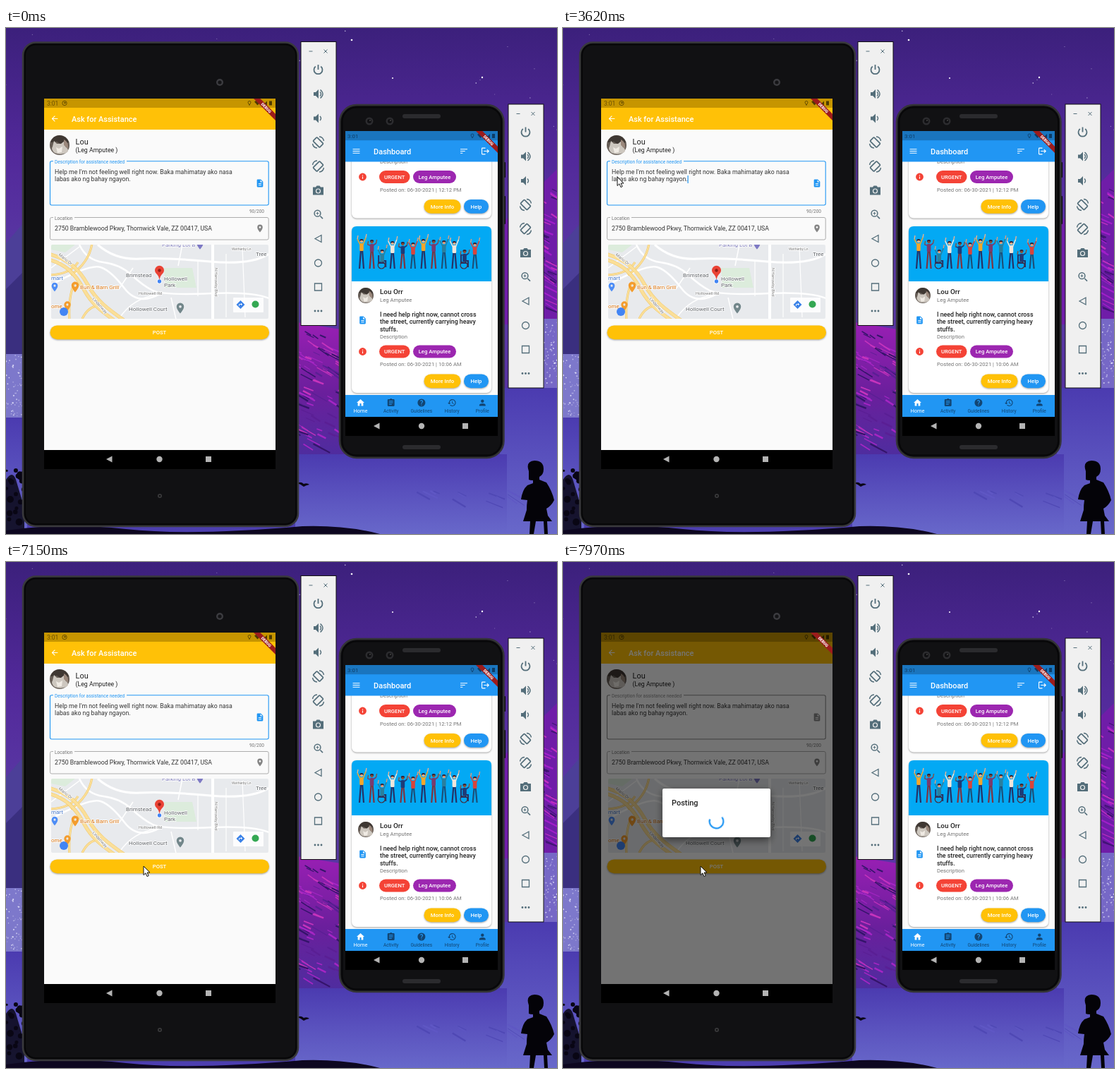
An HTML page that plays this animation: 781x717 px, repeating every 8000 ms.

```html
<!DOCTYPE html>
<html lang="en">
<head>
<meta charset="utf-8">
<title>Assistance request</title>
<style>
html, body { margin: 0; width: 100%; height: 100%; overflow: hidden; background: #38217f; }
svg { display: block; }
#stage { width: 100vw; height: 100vh; font-family: Roboto, "Open Sans", sans-serif; }
.shadow { filter: drop-shadow(0 1px 1px rgba(0,0,0,.35)); }
.deep { filter: drop-shadow(0 4px 6px rgba(0,0,0,.5)); }
</style>
</head>
<body>
<svg id="stage" viewBox="0 0 781 717"></svg>
<script>
const LOOP = 8000;
const BLUE = '#2196f3', AMBER = '#ffc107', SLATE = '#546e7a';

let seed = 11;
const rand = (a = 0, b = 1) => {
  seed = (seed * 16807) % 2147483647;
  return a + (b - a) * seed / 2147483647;
};
const repeat = (n, make) => Array.from({ length: n }, (_, i) => make(i)).join('');
const rect = (x, y, w, h, fill, r = 0, extra = '') =>
  `<rect x="${x}" y="${y}" width="${w}" height="${h}" rx="${r}" fill="${fill}" ${extra}/>`;
const circle = (x, y, r, fill, extra = '') => `<circle cx="${x}" cy="${y}" r="${r}" fill="${fill}" ${extra}/>`;
const path = (d, fill, extra = '') => `<path d="${d}" fill="${fill}" ${extra}/>`;
const line = (d, color, width, extra = '') =>
  path(d, 'none', `stroke="${color}" stroke-width="${width}" ${extra}`);
const text = (x, y, size, fill, str, extra = '') =>
  `<text x="${x}" y="${y}" font-size="${size}" fill="${fill}" ${extra}>${str}</text>`;
const MEDIUM = 'font-weight="500"', MIDDLE = 'text-anchor="middle"';

const ICONS = {
  back: 'M20 11H7.8l5.6-5.6L12 4l-8 8 8 8 1.4-1.4L7.8 13H20z',
  doc: 'M14 2H6a2 2 0 0 0-2 2v16a2 2 0 0 0 2 2h12a2 2 0 0 0 2-2V8zm2 16H8v-2h8zm0-4H8v-2h8zm-3-5V3.5L18.5 9z',
  place: 'M12 2a7 7 0 0 0-7 7c0 5.2 7 13 7 13s7-7.8 7-13a7 7 0 0 0-7-7zm0 9.5a2.5 2.5 0 1 1 0-5 2.5 2.5 0 0 1 0 5z',
  menu: 'M3 18h18v-2H3zm0-5h18v-2H3zm0-7v2h18V6z',
  sort: 'M3 18h6v-2H3zM3 6v2h18V6zm0 7h12v-2H3z',
  logout: 'M17 7l-1.4 1.4L18.2 11H8v2h10.2l-2.6 2.6L17 17l5-5zM4 5h8V3H4a2 2 0 0 0-2 2v14a2 2 0 0 0 2 2h8v-2H4z',
  info: 'M12 2a10 10 0 1 0 0 20 10 10 0 0 0 0-20zm1 15h-2v-6h2zm0-8h-2V7h2z',
  home: 'M10 20v-6h4v6h5v-8h3L12 3 2 12h3v8z',
  list: 'M19 3h-4.2a3 3 0 0 0-5.6 0H5a2 2 0 0 0-2 2v14a2 2 0 0 0 2 2h14a2 2 0 0 0 2-2V5a2 2 0 0 0-2-2zm-5 14H7v-2h7zm3-4H7v-2h10zm0-4H7V7h10z',
  help: 'M12 2a10 10 0 1 0 0 20 10 10 0 0 0 0-20zm1 17h-2v-2h2zm2-7.7c-1.5 1.2-2 1.7-2 3.7h-2c0-3 1-3.5 2.4-4.9A2 2 0 1 0 10 8H8a4 4 0 1 1 7 3.3z',
  history: 'M13 3a9 9 0 0 0-9 9H1l4 4 4-4H6a7 7 0 1 1 2 5l-1.4 1.4A9 9 0 1 0 13 3zm-1 5v5l4.3 2.5.7-1.2-3.5-2.1V8z',
  person: 'M12 12a4 4 0 1 0 0-8 4 4 0 0 0 0 8zm0 2c-2.7 0-8 1.3-8 4v2h16v-2c0-2.7-5.3-4-8-4z'
};
const icon = (name, x, y, size, fill) =>
  path(ICONS[name], fill, `fill-rule="evenodd" transform="translate(${x - size / 2} ${y - size / 2}) scale(${size / 24})"`);

function wallpaper() {
  const streaks = (n, x0, x1, y0, y1, colors) => repeat(n, i => {
    const x = rand(x0, x1), y = rand(y0, y1), w = rand(6, 24);
    return line(`M${x} ${y}l${w} ${w * rand(.35, .75)}`, colors[i % colors.length], rand(.8, 2.6));
  });
  const dots = (n, x0, x1, y0, y1, r) => repeat(n, () =>
    circle(rand(x0, x1), rand(y0, y1), rand(.4, r), '#eef', `opacity="${rand(.3, .9)}"`));
  return rect(0, 0, 781, 717, 'url(#sky)')
    + dots(26, 0, 781, 0, 180, .8)
    + circle(490, 17, 1.3, '#fff') + circle(675, 70, 1.2, '#fff') + circle(548, 71, 1, '#fff')
    + path('M0 305L30 270V480H0z', '#4c3f98') + path('M0 370l30-30v130H0z', '#3a2f7f')
    + rect(0, 462, 30, 95, '#7d78cb') + dots(70, 0, 26, 464, 550, 1.2)
    + rect(0, 552, 30, 165, 'url(#lake)')
    + path('M690 290L781 200V420H690z', '#6f1da8')
    + streaks(40, 745, 775, 225, 400, ['#a01fc9', '#3f1474', '#c230c0'])
    + rect(755, 412, 26, 100, '#7668c6') + dots(60, 762, 781, 414, 505, 1.2)
    + path('M400 415L480 428V620H400z', 'url(#rock)')
    + streaks(80, 400, 472, 425, 590, ['#a526c4', '#34146a', '#5a1f94', '#c634bc'])
    + rect(700, 510, 81, 207, 'url(#lake)') + rect(410, 604, 300, 113, 'url(#lake)')
    + streaks(14, 560, 720, 655, 672, ['#5f57c4', '#4f48b4'])
    + path('M0 640q9-14 14 0l12 40v37H0z', '#090614', 'opacity=".85"')
    + repeat(26, () => circle(rand(0, 32), rand(618, 700), rand(1.5, 5), '#090614'))
    + path('M0 712q80-12 170-2t250-4q60-2 110 11H0z', '#0d0720')
    + path('M413 645q5-3 9 1 5-2 8 1-5 1-8 3-3-3-9-5z', '#0a0616')
    + silhouette();
}

const silhouette = () => path('M741 628q-5-14 8-15 13 0 13 12 0 8-6 11v4l10 4q8 12 11 25-4 8-11 12l2 10 6 8h-7l1 18h-5l-1-18h-11l-3 18h-6l1-18h-10l5-16q0-8 1-14l-9-1q2-14 9-20l8-3v-4q-4 0-6-1z', '#040308');

function avatar(x, y, r) {
  return `<g transform="translate(${x} ${y}) scale(${r / 14})">` + circle(0, 0, 14, '#655c55')
    + path('M-13-4q4-10 13-10 10 1 13 10l-9 4-8-5z', '#3f3833')
    + path('M-8-6l4 4h6l5-4 1 8q6 4 3 8-9 5-18 1-6-5-3-9z', '#cdc7bf')
    + path('M-5 3l4 2 5-3-1 8-6 1z', '#f0ebe4') + path('M6-8q7 3 6 13l-6-5z', '#9a877b') + '</g>';
}

function banner(x, y) {
  return `<g transform="translate(${x} ${y}) rotate(45) scale(.548)">`
    + rect(-40, 28, 80, 12, '#9c1c1c')
    + text(0, 37.6, 10.2, '#fff', 'DEBUG', 'text-anchor="middle" font-weight="900"') + '</g>';
}

function statusIcons(x, y, fill) {
  return line(`M${x - 30} ${y + 3}l-2-4a2 2 0 1 1 4 0z`, fill, .8)
    + path(`M${x - 23} ${y - 2}q5-4 9 0l-4.5 5z`, fill)
    + path(`M${x - 5} ${y - 3}v6h-6z`, fill) + rect(x - 2, y - 3, 4, 6, fill);
}

const navKeys = (a, b, c, y) => path(`M${a - 5} ${y}l8.5-4.5v9z`, '#b4b4b4')
  + circle(b, y, 4.2, '#b4b4b4') + rect(c - 4, y - 4, 8, 8, '#b4b4b4');

function toolbar(dx, dy) {
  const s = (d, w = 1.6) => line(d, SLATE, w);
  const rotate = (y, flip) => `<g transform="translate(442.5 ${y}) scale(${flip} 1)">`
    + rect(-6.5, -3.8, 13, 7.6, 'none', 1, `stroke="${SLATE}" stroke-width="1.7" transform="rotate(45)"`)
    + s('M1.5-8q5.5.5 6.5 6M-1.5 8q-5.5-.5-6.5-6', 1.4) + '</g>';
  const speaker = y => path(`M436 ${y - 2.5}v5h3l4 4v-13l-4 4z`, SLATE);
  return `<g transform="translate(${dx} ${dy})">`
    + rect(418, 19.5, 50, 402, '#f0f0f0', 0, 'stroke="#111"')
    + s('M429.5 33h5M450.5 30.5l5 5m0-5l-5 5', 1)
    + s('M438.8 54.5a6 6 0 1 0 7.4 0M442.5 52v7', 1.8)
    + speaker(93.5) + s('M445 90.5q3 3 0 6M445.5 87.5q7 6 0 12', 1.4)
    + speaker(128) + s('M445 125q3 3 0 6', 1.4)
    + rotate(162, 1) + rotate(196, -1)
    + path('M435 225.5h4l1.5-2h4l1.5 2h4v11h-15z', SLATE) + circle(442.5, 231, 3, SLATE, 'stroke="#f0f0f0" stroke-width="1.2"')
    + s('M445.4 266.5l3.6 3.6') + circle(441.5, 262.7, 4.4, 'none', `stroke="${SLATE}" stroke-width="1.5"`) + s('M439.5 262.7h4m-2-2v4', 1)
    + s('M438 298.5l9-5v10z', 1.3) + circle(442.5, 333, 5, 'none', `stroke="${SLATE}" stroke-width="1.3"`)
    + s('M437.5 362h10v10h-10z', 1.3)
    + repeat(3, i => circle(438 + i * 4.5, 401, 1.4, SLATE)) + '</g>';
}

function map() {
  const road = (d, w = 2.5) => line(d, '#fff', w);
  const label = (x, y, str, fill = '#5f6368', size = 8, extra = '') =>
    text(x, y, size, fill, str, `stroke="#fff" stroke-width="1.5" paint-order="stroke" ${extra}`);
  const highway = (d, w) => line(d, '#efc66a', w + 1) + line(d, '#fbdf98', w);
  return '<g clip-path="url(#mapClip)">' + rect(64, 307, 308, 105, '#e8eaed')
    + path('M224 340h40l6 28h-44zM64 307h34l-14 11-20-4z', '#dcecdc')
    + road('M104 307q10 22 34 25t40 18 30 22 84 4 90 12') + road('M64 364q55-30 70-25t34 30 50 8')
    + road('M130 307q25 22 60 20t100 4 90-16', 3) + road('M293 300v120', 4) + road('M160 412q20-30 55-34m35-71l-6 30m-10 45l8 35', 1.5)
    + road('M272 330v50M312 320v90M335 310l4 100', 1.2) + road('M64 340l40-30M180 340l-20 30', 1.5)
    + highway('M64 350q28-2 38-18M92 350q26-18 30-45M98 360q-10 18-8 55M108 412q10-20 26-18', 2.2)
    + highway('M60 320C88 327 104 342 116 364S144 398 170 416', 4) + highway('M60 328C84 334 98 348 110 370S136 402 156 416', 4)
    + label(221, 310, 'Parking Lot B', '#7a78b8') + label(354, 323, 'Tree')
    + label(320, 315, 'Wetherby Ln', '#777', 5) + label(74, 322, 'Marlo Dr', '#777', 6, 'transform="rotate(38 74 322)"')
    + label(170, 353, 'Brimstead') + label(224, 358, 'Hollowell') + label(224, 367, 'Park')
    + label(188, 378, 'Hollowell Rd', '#777', 6) + label(174, 401, 'Hollowell Court')
    + label(105, 370, 'Bun &amp; Barn Grill', '#d7720e') + label(64, 357, 'mart', '#4275c8') + label(64, 397, 'ome', '#d7720e')
    + label(122, 384, 'Lindenway', '#777', 6, 'transform="rotate(48 122 384)"')
    + label(296, 340, 'N Harrowby Blvd', '#777', 5.5, 'transform="rotate(90 296 340)"')
    + icon('place', 98, 367, 18, '#f39c2d') + icon('place', 87, 394, 16, '#f39c2d')
    + icon('place', 69, 367, 15, '#4d8df6') + icon('place', 247, 397, 18, '#72868a') + icon('place', 275, 307, 16, '#7d79c4')
    + circle(82, 402, 6, '#4285f4')
    + circle(217.5, 359, 3.6, '#fff') + circle(217.5, 359, 2.7, '#4285f4')
    + path('M217.5 357q-1-6-4.5-9a6.5 6.5 0 1 1 9 0q-3.5 3-4.5 9z', '#ea4335') + circle(217.5, 343.5, 2.2, '#901d16')
    + rect(322, 382, 43, 21, '#fff', 1, 'opacity=".88"')
    + path('M332.5 386l6 6-6 6-6-6z', '#3b82e8') + line('M330.5 394v-2.5h4m-1.5-1.5l1.5 1.5-1.5 1.5', '#fff', .9)
    + circle(353.5, 391.5, 5, '#34a853') + '</g>';
}

function tablet() {
  return rect(24, 20.5, 390, 685.5, '#111113', 18, 'stroke="#39393c" stroke-width="2.5"')
    + rect(27, 23.5, 384, 679.5, 'none', 15, 'stroke="#070708" stroke-width="2"')
    + circle(303, 77, 5, '#3c3c40') + circle(303, 77, 2.6, '#141416') + circle(218, 663, 3, '#3a3a3c') + circle(218, 663, 1.3, '#111')
    + rect(54, 100, 328, 525, '#000') + rect(54, 100, 328, 498, '#fafafa')
    + rect(54, 113, 328, 31, AMBER) + rect(54, 100, 328, 13, '#c69500')
    + text(58, 110, 8.5, '#6b5000', '3:01') + circle(83, 106.5, 3.2, 'none', 'stroke="#6b5000"') + circle(83.5, 106, 1.3, '#6b5000')
    + statusIcons(375, 106.5, '#4f3b00')
    + icon('back', 69, 128.5, 13, '#fff') + text(93, 132.5, 10.94, '#fff', 'Ask for Assistance', MEDIUM)
    + avatar(76, 166, 14) + text(98.5, 165, 10.94, '#222', 'Lou') + text(98.5, 175.5, 8.75, '#222', '(Leg Amputee )')
    + '<g id="focus" color="#2196f3">' + rect(62.5, 188.8, 309.7, 62.2, 'none', 2.2, 'stroke="currentColor" stroke-width="1.1"')
    + rect(67, 187, 104, 4, '#fafafa') + text(69, 192, 6.56, 'currentColor', 'Description for assistance needed')
    + icon('doc', 360, 220, 13, 'currentColor') + '</g>'
    + text(69, 207, 8.75, '#333', "Help me I'm not feeling well right now. Baka mahimatay ako nasa")
    + text(69, 217.3, 8.75, '#333', 'labas ako ng bahay ngayon.')
    + rect(176.5, 209, 1.2, 11, BLUE, 0, 'id="caret"')
    + text(366, 262, 6.56, '#757575', '90/200', 'text-anchor="end"')
    + rect(62.5, 268.5, 309.7, 31.5, 'none', 2.2, 'stroke="#a4a4a4" stroke-width=".9"')
    + rect(67, 267, 30, 4, '#fafafa') + text(69, 271.5, 6.56, '#757575', 'Location')
    + text(69, 287, 8.75, '#333', '2750 Bramblewood Pkwy, Thornwick Vale, ZZ 00417, USA')
    + icon('place', 360, 284, 13, '#858585') + map()
    + rect(62.5, 421.5, 310.5, 19.7, AMBER, 9.8, 'class="shadow"')
    + text(217.5, 434.3, 7.66, '#fff', 'POST', `${MEDIUM} ${MIDDLE}`)
    + '<g id="modal" opacity="0">' + rect(54, 100, 328, 498, '#000', 0, 'opacity=".54"')
    + rect(141, 321, 153, 69, '#fff', 2.2, 'class="deep"') + text(154, 344.5, 10.94, '#222', 'Posting', MEDIUM)
    + '<g id="spinner">' + circle(217.5, 367.5, 9.8, 'none', `id="arc" pathLength="360" stroke="${BLUE}" stroke-width="2.2"`) + '</g></g>'
    + '<g clip-path="url(#tabletClip)">' + banner(382, 100) + '</g>' + navKeys(147, 217.5, 287, 611);
}

function crowd() {
  const skins = ['#f3b48d', '#8b4f38', '#e79d77'];
  const shirts = ['#f4a62a', '#d8443c', '#1d3b78', '#f1e6dc', '#2a7f9e', '#7a3b6f'];
  const trousers = ['#253266', '#7d3340', '#1c4f78'];
  return repeat(12, i => {
    const seated = i === 2 || i === 10, x = 504 + i * 14.6, y = seated ? 317 : 302 + i * 7 % 6;
    const shirt = shirts[i * 5 % 6], skin = skins[i % 3], reach = i % 3 === 1 ? -2 : -9;
    const feet = 341 - y;
    const lower = seated
      ? line('M-1 13h6v9M-5 5v11h8', trousers[0], 2) + circle(-1, 19, 5, 'none', 'stroke="#4a2b38" stroke-width="1.2"')
      : line(`M-1 13L-3 ${feet}M1 13L3 ${feet}`, trousers[i % 3], 2.2);
    return `<g transform="translate(${x} ${y})">` + lower
      + line(`M-2 5L-6 ${reach + 6}M2 5L6 ${reach + 4}`, shirt, 1.6)
      + line(`M-6 ${reach + 6}l1-5M6 ${reach + 4}l1-5`, skin, 1.3)
      + circle(0, 0, 2.2, skin) + path('M-2.4 0q-1-3 2.4-3t2.4 3q-2-2-4.800 0z', '#3a2030')
      + rect(-2.8, 3, 5.6, 11, shirt, 1.5) + '</g>';
  });
}

function phone() {
  const chip = (x, y, w, fill, str) => rect(x, y, w, 18, fill, 9)
    + text(x + w / 2, y + 11.8, 7.7, '#fff', str, `${MEDIUM} ${MIDDLE}`);
  const button = (x, y, w, fill, str) => rect(x, y, w, 19.7, fill, 9.8, 'class="shadow"')
    + text(x + w / 2, y + 12.8, 7.7, '#fff', str, `${MEDIUM} ${MIDDLE}`);
  const details = (y, time) => text(530, y - 19, 7.7, '#757575', 'Description') + icon('info', 505.5, y, 13, '#f44336')
    + chip(529, y - 9, 43.5, '#f44336', 'URGENT') + chip(577, y - 9, 61, '#9c27b0', 'Leg Amputee')
    + text(530, y + 20.5, 7.7, '#757575', `Posted on: 06-30-2021 | ${time}`)
    + button(592.5, y + 32, 52, AMBER, 'More Info') + button(649, y + 32, 35, BLUE, 'Help');
  const tabs = [['home', 'Home'], ['list', 'Activity'], ['help', 'Guidelines'], ['history', 'History'], ['person', 'Profile']];
  const body = (y, str) => text(530, y, 8.8, '#222', str, MEDIUM);
  return rect(705, 238, 3, 40, '#080808', 1) + rect(705, 190, 3, 22, '#080808', 1)
    + rect(473, 109, 232.5, 500, '#111113', 24, 'stroke="#343437" stroke-width="2.5"')
    + rect(476.5, 112.5, 225.5, 493, 'none', 20, 'stroke="#070708" stroke-width="2"')
    + [515, 544].map(x => circle(x, 132, 5.5, '#2c2c2f') + circle(x, 132, 3, '#101013') + circle(x + 1, 131, 1, '#444')).join('')
    + rect(562, 122, 54, 6, '#2b2b2e', 3) + rect(562, 591, 54, 6, '#2b2b2e', 3)
    + '<g clip-path="url(#phoneClip)">' + rect(481, 146, 216, 432, '#000') + rect(481, 146, 216, 405, '#fafafa')
    + rect(490, 160, 198, 109.5, '#fff', 7, 'class="shadow"') + details(211, '12:12 PM')
    + rect(490, 281, 198, 236, '#fff', 7, 'class="shadow"')
    + path('M490 359v-71q0-7 7-7h184q7 0 7 7v71z', '#03a9f4') + crowd()
    + avatar(510, 379, 11) + text(530, 376.5, 9.9, '#222', 'Lou Orr', MEDIUM) + text(530, 387.5, 7.7, '#757575', 'Leg Amputee')
    + body(409, 'I need help right now, cannot cross') + body(419.3, 'the street, currently carrying heavy') + body(429.6, 'stuffs.')
    + icon('doc', 505.5, 414, 13, BLUE) + details(458.5, '10:06 AM')
    + rect(481, 146, 216, 43.5, BLUE) + rect(481, 146, 216, 13.2, '#1a75be')
    + text(484, 156, 8, '#0d3c66', '3:01') + statusIcons(691, 153, '#0d3c66')
    + icon('menu', 496.5, 174.5, 13.2, '#fff') + text(521, 178.5, 11, '#fff', 'Dashboard', MEDIUM)
    + icon('sort', 649, 174.5, 13.2, '#fff') + icon('logout', 679.5, 174.5, 13.2, '#fff')
    + rect(481, 520, 216, 31, BLUE)
    + tabs.map(([name, str], i) => {
      const x = 502.5 + i * 43.2, fill = i ? '#124573' : '#fff';
      return icon(name, x, 531, 13.2, fill) + text(x, 544.8, i ? 6.6 : 7.5, fill, str, MIDDLE);
    }).join('')
    + navKeys(526, 589, 651, 564) + banner(697, 146) + '</g>';
}

const clip = (id, x, y, w, h, r = 0) => `<clipPath id="${id}">${rect(x, y, w, h, '#000', r)}</clipPath>`;
const gradient = (id, colors) => `<linearGradient id="${id}" x2="0" y2="1">`
  + colors.map((c, i) => `<stop offset="${i / (colors.length - 1)}" stop-color="${c}"/>`).join('') + '</linearGradient>';

document.getElementById('stage').innerHTML = '<defs>'
  + gradient('sky', ['#3c207c', '#52299a', '#5b3aa6', '#55309f', '#4c3fb0'])
  + gradient('lake', ['#4b3bb0', '#5a52be', '#6868ca']) + gradient('rock', ['#9a1fb4', '#6a1f9c', '#4a2f9f'])
  + clip('mapClip', 64, 307, 308, 105, 2) + clip('tabletClip', 54, 100, 328, 498) + clip('phoneClip', 481, 146, 216, 432) + '</defs>'
  + wallpaper() + tablet() + toolbar(0, 0) + phone() + toolbar(294, 88.5)
  + '<g id="cursor">' + path('M0 0v12.5l2.9-2.7 2.1 4.8 2.2-1-2.1-4.6H9z', '#fff', 'stroke="#111" stroke-width="1"') + '</g>';

// Rows are [time in ms, value, easing towards the next row].
function play(id, prop, rows, format = v => v) {
  const first = rows[0], last = rows[rows.length - 1];
  const full = [...(first[0] > 0 ? [[0, first[1]]] : []), ...rows, ...(last[0] < LOOP ? [[LOOP, last[1]]] : [])];
  document.getElementById(id).animate(
    full.map(([t, v, easing = 'linear']) => ({ offset: t / LOOP, [prop]: format(v), easing })),
    { duration: LOOP, iterations: Infinity });
}

const POSTED = 7640, BLINK = 508;
const blinks = Array.from({ length: 15 }, (_, i) => [260 + i * BLINK, i % 2 ? 0 : 1, 'step-end'])
  .filter(([t]) => t < POSTED);
play('caret', 'opacity', [[0, 0, 'step-end'], ...blinks, [POSTED, 0]]);

play('cursor', 'opacity', [[0, 0, 'step-end'], [1030, 1, 'step-end']]);
play('cursor', 'transform', [
  [1030, [652, 668], 'ease-out'], [1470, [262, 437], 'ease-out'], [1790, [252, 431], 'step-end'], [1920, [251, 431]],
  [2740, [251, 431], 'ease-in-out'], [3380, [77, 211]],
  [3620, [77, 211], 'ease-in'], [4380, [247, 211]], [4630, [300, 210], 'ease-out'], [4820, [306, 210]],
  [5070, [306, 210], 'ease-in-out'], [5820, [77, 216]],
  [5890, [80, 216]], [6210, [184, 226]], [6650, [195, 407]], [6960, [195, 431]]
], ([x, y]) => `translate(${x}px, ${y}px)`);

play('modal', 'opacity', [[POSTED, 0, 'ease-out'], [POSTED + 150, 1]]);
play('focus', 'color', [[POSTED, BLUE], [POSTED + 200, '#8a8a8a']]);
document.getElementById('spinner').style.transformOrigin = '217.5px 367.5px';
play('spinner', 'transform', [[POSTED, -90], [LOOP, -32]], v => `rotate(${v}deg)`);
play('arc', 'strokeDasharray', [[POSTED, 0], [7740, 20], [7840, 130], [7940, 220], [LOOP, 248]], v => `${v} 360`);
</script>
</body>
</html>
```
